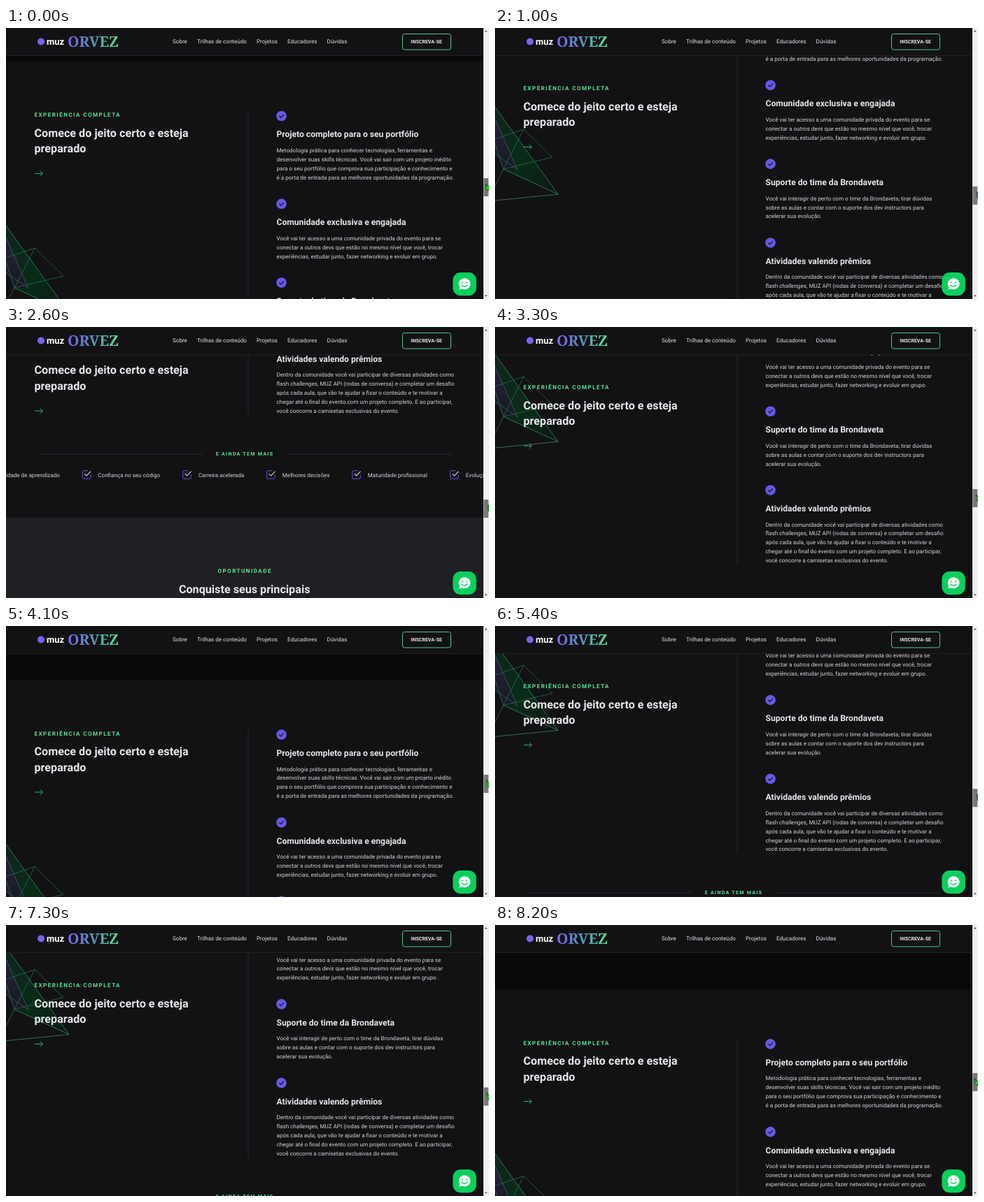
An HTML page that plays this animation: 690x388 px, repeating every 8300 ms.

```html
<!DOCTYPE html>
<html lang="pt-BR">
<head>
<meta charset="utf-8">
<title>Página em rolagem</title>
<style>
  html, body { margin: 0; width: 100%; height: 100%; overflow: hidden; background: #121214; }
  svg { display: block; width: 690px; height: 388px; }
  text { font: 8.08px Roboto, sans-serif; fill: #d4d4d9; text-rendering: geometricPrecision; white-space: pre; }
  .nav { fill: #e1e1e6; }
  .head { font-size: 12.12px; font-weight: 700; fill: #e6e6ea; }
  .title { font-size: 16.16px; font-weight: 700; fill: #e6e6ea; }
  .label { font-weight: 700; letter-spacing: 1.45px; fill: #58e294; }
  .more { font-size: 7.07px; font-weight: 700; letter-spacing: 1.28px; fill: #58e294; }
  .cta { font-size: 7.07px; font-weight: 700; fill: #e6e6ea; }
  .tag { font-size: 13px; font-weight: 700; fill: #fff; }
  .event { font: 700 21px "Noto Serif", serif; fill: url(#brand); }
  .mid { text-anchor: middle; }
  .rule { stroke: #29292e; fill: none; }
</style>
</head>
<body>
<svg viewBox="0 0 690 388">
  <defs>
    <linearGradient id="brand">
      <stop offset="0" stop-color="#7a62f0"/>
      <stop offset=".5" stop-color="#5493b8"/>
      <stop offset="1" stop-color="#58e08c"/>
    </linearGradient>
    <linearGradient id="leaf" x1="0" y1="0" x2="1" y2="1">
      <stop offset="0" stop-color="#12241d"/>
      <stop offset=".55" stop-color="#082b18"/>
      <stop offset="1" stop-color="#101613"/>
    </linearGradient>
    <linearGradient id="haze" x1="0" y1="0" x2="0" y2="1">
      <stop offset="0" stop-color="#24233a"/>
      <stop offset="1" stop-color="#181922"/>
    </linearGradient>
    <clipPath id="view"><rect width="682" height="388"/></clipPath>
  </defs>

  <g clip-path="url(#view)">
    <rect width="682" height="388" fill="#121214"/>
    <g id="page">
      <rect y="-200" width="682" height="248" fill="#09090a"/>
      <rect y="731" width="682" height="400" fill="#202024"/>
      <g stroke-width=".7" stroke-linejoin="round" fill="none">
        <path d="M0 283L90 408L12 372L0 336Z" fill="url(#leaf)"/>
        <path d="M0 300L32 373L12 372L0 350Z" fill="url(#haze)"/>
        <path d="M0 283L90 408L0 417M12 372L90 408" stroke="#399a67"/>
        <path d="M0 329L41 315L82 355L12 372L41 315" stroke="#2a7855"/>
        <path d="M0 300L32 373L0 350M0 335L12 372L0 396" stroke="#3d6d63"/>
      </g>
      <path class="rule" d="M346 119V585"/>
      <path class="rule" d="M46 640.5H281M400 640.5H636"/>
      <text class="more mid" x="341" y="642.3">E AINDA TEM MAIS</text>
      <text class="label mid" x="341.2" y="809.8">OPORTUNIDADE</text>
      <text class="title mid" x="340.7" y="838.7">Conquiste seus principais</text>
      <g id="perks"></g>
      <g id="belt"></g>
    </g>
    <g id="side">
      <text class="label" x="40.5" y="127.4">EXPERIÊNCIA COMPLETA</text>
      <text class="title" x="40.5" y="155.6">Comece do jeito certo e esteja</text>
      <text class="title" x="40.5" y="178.4">preparado</text>
      <path d="M41 208.3H52.5M48.8 204.6L52.5 208.3L48.8 212" fill="none" stroke="#2fb081"/>
    </g>

    <rect width="682" height="39.5" fill="#121214"/>
    <path d="M0 39.5H682" stroke="#222226"/>
    <circle cx="50" cy="19.5" r="5" fill="#7a62f0"/>
    <text class="tag" x="58" y="23.5">muz</text>
    <text class="event" x="88" y="27">ORVEZ</text>
    <g id="menu"></g>
    <rect x="566.5" y="8.5" width="69" height="22.5" rx="3" fill="none" stroke="#55c48a"/>
    <text class="cta mid" x="600.7" y="22">INSCREVA-SE</text>

    <rect x="638.4" y="350" width="33.4" height="33.2" rx="11" fill="#0bcf5d"/>
    <path d="M655 358.2a8.4 8 0 1 1-3.6 15.2l-4.2 1.2 1.2-3.8A8.4 8 0 0 1 655 358.2Z" fill="#fff"/>
    <circle cx="652.2" cy="364.6" r="1.1" fill="#0bcf5d"/>
    <circle cx="657.8" cy="364.6" r="1.1" fill="#0bcf5d"/>
    <path d="M650.8 368Q655 372.4 659.2 368" fill="none" stroke="#0bcf5d" stroke-width="1.4" stroke-linecap="round"/>
  </g>

  <rect x="682" width="8" height="388" fill="#f1f1f1"/>
  <path d="M683.8 5.6L685.8 3.2L687.8 5.6ZM683.8 382.4L685.8 384.8L687.8 382.4Z" fill="#505050"/>
  <rect id="thumb" x="682.4" y="215" width="6.8" height="26" fill="#787878"/>
  <path id="hand" d="M0 -4.5L1.6 -4.8L2.4 -2L6 -1V4.5H2.4L.2 .8L1 0Z" fill="#16d321" stroke="#0a3d0c" stroke-width=".8"/>
</svg>

<script>
const LOOP = 8300, TICK = 100, NOTCH = 7.39;

const $ = id => document.getElementById(id);
const write = (x, y, str, cls = "") => `<text class="${cls}" x="${x}" y="${y}">${str}</text>`;

$("menu").innerHTML = [
  [238, "Sobre"], [273, "Trilhas de conteúdo"], [358, "Projetos"],
  [402, "Educadores"], [458.6, "Dúvidas"]
].map(([x, str]) => write(x, 22.1, str, "nav")).join("");

const perks = [
  [126, "Projeto completo para o seu portfólio",
    "Metodologia prática para conhecer tecnologias, ferramentas e",
    "desenvolver suas skills técnicas. Você vai sair com um projeto inédito",
    "para o seu portfólio que comprova sua participação e conhecimento e",
    "é a porta de entrada para as melhores oportunidades da programação."],
  [251.8, "Comunidade exclusiva e engajada",
    "Você vai ter acesso a uma comunidade privada do evento para se",
    "conectar a outros devs que estão no mesmo nível que você, trocar",
    "experiências, estudar junto, fazer networking e evoluir em grupo."],
  [364.6, "Suporte do time da Brondaveta",
    "Você vai interagir de perto com o time da Brondaveta, tirar dúvidas",
    "sobre as aulas e contar com o suporte dos dev instructors para",
    "acelerar sua evolução."],
  [477.4, "Atividades valendo prêmios",
    "Dentro da comunidade você vai participar de diversas atividades como",
    "flash challenges, MUZ API (rodas de conversa) e completar um desafio",
    "após cada aula, que vão te ajudar a fixar o conteúdo e te motivar a",
    "chegar até o final do evento com um projeto completo. E ao participar,",
    "você concorre a camisetas exclusivas do evento."]
];
$("perks").innerHTML = perks.map(([y, head, ...lines]) =>
  `<circle cx="393.5" cy="${y}" r="7.3" fill="#6659e8"/>
   <path d="M390.3 ${y}l2.3 2.3l4.2 -4.4" fill="none" stroke="#17161f" stroke-width="1.3"/>` +
  write(386.5, y + 30.4, head, "head") +
  lines.map((str, i) => write(386.5, y + 52 + i * 12.93, str)).join("")
).join("");

$("belt").innerHTML = [
  [-36.5, "Velocidade de aprendizado"], [115, "Confiança no seu código"],
  [258.5, "Carreira acelerada"], [378.5, "Melhores decisões"],
  [500.5, "Maturidade profissional"], [640.5, "Evolução constante"]
].map(([x, str]) =>
  `<path d="M${x + 2} 664H${x - 4.4}q-1.4 0 -1.4 1.4V674q0 1.4 1.4 1.4H${x + 4.4}q1.4 0 1.4 -1.4V669.6" fill="none" stroke="#6454dc"/>
   <path d="M${x - 2.8} 668.4l2.8 2.8l6 -6.4" fill="none" stroke="#e1e1e6" stroke-width="1.1"/>` +
  write(x + 16.3, 673.6, str)
).join("");

// time, scroll notches, pointer x
const drag = [
  [0, 0, 685], [1000, 23, 687.8], [2600, 62, 688], [2750, 63, 688],
  [3950, -5, 686], [4100, -4, 686], [5400, 35, 687.8], [6300, 57, 688],
  [6600, 61, 688], [8200, -6, 684.6], [LOOP, -6, 684.6]
];
const rate = i => (drag[i + 1][1] - drag[i][1]) / (drag[i + 1][0] - drag[i][0]);
// harmonic mean keeps the curve from overshooting at turns
const slope = i => {
  if (i === 0) return rate(0);
  if (i === drag.length - 1) return 0;
  const a = rate(i - 1), b = rate(i);
  return a * b > 0 ? 2 * a * b / (a + b) : 0;
};

function pose(t) {
  let i = 0;
  while (t >= drag[i + 1][0]) i++;
  const [t0, k0, x0] = drag[i], [t1, k1, x1] = drag[i + 1];
  const d = t1 - t0, u = (t - t0) / d, v = 1 - u;
  const k = v * v * (1 + 2 * u) * k0 + u * u * (3 - 2 * u) * k1
          + d * u * v * (v * slope(i) - u * slope(i + 1));
  return [Math.round(k) * NOTCH, x0 + (x1 - x0) * u];
}

const move = (id, x, y) => $(id).setAttribute("transform", `translate(${x} ${y})`);

function draw(now) {
  const t = Math.floor(now % LOOP / TICK) * TICK;
  const [scroll, x] = pose(t);
  const bar = scroll * 0.07;
  move("page", 0, -scroll);
  move("side", 0, -Math.min(scroll, 38) - Math.max(0, scroll - 408));
  move("belt", (t - 2600) * 0.00635, 0);
  move("thumb", 0, bar);
  move("hand", x, 228 + bar);
}

let start;
function tick(now) {
  start ??= now;
  draw(now - start);
  requestAnimationFrame(tick);
}
draw(0);
requestAnimationFrame(tick);
</script>
</body>
</html>
```
